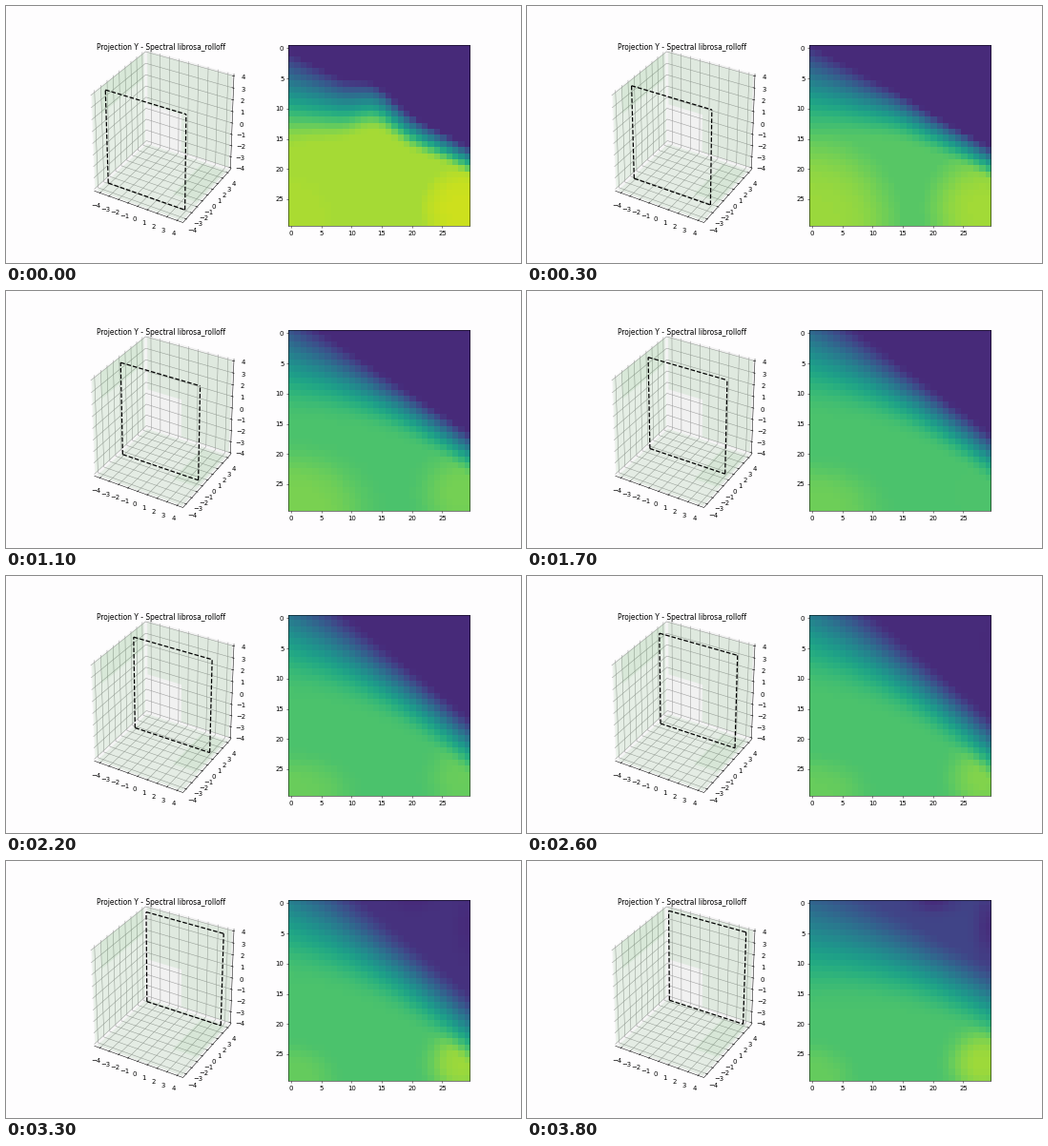
These frames come from a looping animation (540 by 270 pixels, 3.9 s). A matplotlib script:

```python
import numpy as np
import matplotlib.pyplot as plt
from matplotlib.animation import FuncAnimation
from matplotlib.patches import Polygon

FRAMES, STEP = 39, 100
SPAN_XY, SPAN_Z = 8.8, 8.0      # axis ranges of the 3D box
EDGE = 0.5 * 25 / 24            # half size of the box with its margin
UNIT = 1 / 12
GREEN = (0.2, 0.6, 0.2)
TICK_SIZE = 11

fig = plt.figure(figsize=(12, 6), dpi=45, facecolor="#fefdfe")
scene = fig.add_axes([0, 0, 1, 1])
scene.set_xlim(0, 540)
scene.set_ylim(270, 0)
scene.axis("off")


# ---- 3D box -------------------------------------------------------------

def project(p):
    """Perspective view (elevation 30, azimuth -60) from box units to pixels."""
    p = np.asarray(p, float)
    right = p @ [0.866, 0.5, 0]
    up = p @ [-0.25, 0.433, 0.866]
    near = p @ [0.433, -0.75, 0.5]
    scale = 10 / (10 - near)
    return np.stack([165.2 + 102.8 * right * scale,
                     133.5 - 112.4 * up * scale], axis=-1)


def line(points, color, width, z):
    scene.plot(*project(points).T, color=color, lw=width, zorder=z)


def patch(points, color, alpha, z):
    scene.add_patch(Polygon(project(points), closed=True, facecolor=color,
                            alpha=alpha, lw=0, zorder=z))


def wall(axis, side, a, b):
    """Rectangle on a box side between corners a and b of the other two axes."""
    corners = [(a[0], a[1]), (b[0], a[1]), (b[0], b[1]), (a[0], b[1])]
    return [np.insert(c, axis, side) for c in np.array(corners, float)]


def tint(axis, side, a, b, alpha):
    spans = [s for i, s in enumerate((SPAN_XY, SPAN_XY, SPAN_Z)) if i != axis]
    patch(wall(axis, side, np.divide(a, spans), np.divide(b, spans)),
          GREEN, alpha, 3)


def label(point, value):
    x, y = project(point)
    scene.text(x, y, str(value).replace("-", "\u2212"), fontsize=TICK_SIZE,
               ha="center", va="top", zorder=6)


E = EDGE
for axis, side, grey in ((0, -E, 0.95), (1, E, 0.9), (2, -E, 0.925)):
    patch(wall(axis, side, (-E, -E), (E, E)), (grey,) * 3, 0.5, 1)

OUT, IN = E + 0.1 * UNIT, E - 0.2 * UNIT
FAR = E + 0.0722
for v in range(-4, 5):
    h, z = v / SPAN_XY, v / SPAN_Z
    for pts in ([(h, E, E), (h, E, -E), (h, -E, -E)],
                [(-E, h, E), (-E, h, -E), (E, h, -E)],
                [(-E, -E, z), (-E, E, z), (E, E, z)]):
        line(pts, "#999999", 0.8, 2)
    line([(h, -OUT, -E), (h, -IN, -E)], "k", 0.8, 5)
    line([(OUT, h, -E), (IN, h, -E)], "k", 0.8, 5)
    line([(OUT, E, z), (IN, E, z)], "k", 0.8, 5)
    label((h, -FAR, -FAR), v)
    label((FAR, h, -FAR), v)
    label((FAR, FAR, z), v)

line([(-E, -E, -E), (E, -E, -E), (E, E, -E), (E, E, E)], "k", 0.8, 4)

tint(0, -E, (-4.4, -4), (4.4, 4), 0.09)
tint(0, -E, (-3, 1.8), (4, 4), 0.07)
tint(2, -E, (-4.4, -4.4), (4.4, 4.4), 0.08)
tint(2, -E, (1.8, -1.4), (4.2, 4), 0.07)
tint(1, E, (-4.4, -0.6), (4.4, 4), 0.09)
tint(1, E, (-0.7, -4), (4.4, -0.6), 0.09)

scene.text(162.6, 45.9, "Projection Y - Spectral librosa_rolloff",
           fontsize=12, ha="center", va="baseline", zorder=6)

# The moving slice: four dashed edges in the x-z plane.
LOW_L, LOW_R, TOP_L, TOP_R = (-1, -1), (1, -1), (-1, 1), (1, 1)
SIDES = [(LOW_L, LOW_R), (LOW_L, TOP_L), (LOW_R, TOP_R), (TOP_L, TOP_R)]
dashes = [scene.plot([], [], "k--", lw=2, zorder=7)[0] for _ in SIDES]


# ---- slice image --------------------------------------------------------

N = 30
row, col = np.mgrid[0:N, 0:N].astype(float)


def blob(cx, cy, rx, ry, power=1):
    return np.exp(-(((col - cx) / rx) ** 2 + ((row - cy) / ry) ** 2) ** power)


def field(i):
    s = min(1, i / 35)
    start = (1 - s) ** 20
    end = (i / (FRAMES - 1)) ** 9
    calm = (1 - s) ** 3

    # Slanted edge of the dark corner and the width of the ramp below it.
    edge = 16.3 - 6 * end - (0.53 + 0.48 * s - 0.45 * end) * (N - 1 - col)
    edge -= 2.2 * start * np.exp(-((col - 14) / 4) ** 2)
    width = 5 + 8 * s + 11 * (1 - col / (N - 1)) ** 2
    u = np.clip((row - edge) / width, 0, 1) ** (1.1 + 0.4 * s)
    ramp = 1 - (1 - u) ** 2

    # Bright lower corners, the whole lower half at the start.
    left = (0.05 + 0.11 * calm) * blob(0, 29, 14 - 8 * s, 5 + 11 * calm, 2)
    size = 5 + 5 * (1 - s) ** 4
    right = (0.14 * abs(np.cos(np.pi * s)) + 0.07 * start) * blob(
        28, 26.5, size, size, 1.5)
    lime = np.maximum(np.maximum(left, right), 0.15 * start)

    notch = blob(20, 0, 3.5, 1.6) + blob(29, 4, 2, 5)
    dark = 0.12 + end * (0.085 - 0.075 * notch)
    return dark + (0.715 - dark) * ramp + lime * ramp ** 6


ax = fig.add_subplot(122)
image = ax.imshow(field(0), cmap="viridis", vmin=0, vmax=1,
                  interpolation="nearest")
ax.set_xticks(range(0, N, 5))
ax.set_yticks(range(0, N, 5))
ax.tick_params(labelsize=TICK_SIZE)


def update(i):
    cell = min(N - 1, np.ceil(3 + 0.75 * i))
    y = (-4 + 8 * cell / (N - 1)) / SPAN_XY
    for dash, ends in zip(dashes, SIDES):
        pts = [(4 * a / SPAN_XY, y, 4 * b / SPAN_Z) for a, b in ends]
        dash.set_data(*project(pts).T)
    image.set_data(field(i))
    return [*dashes, image]


anim = FuncAnimation(fig, update, frames=FRAMES, interval=STEP,
                     repeat=True, repeat_delay=0)
plt.show()
```
